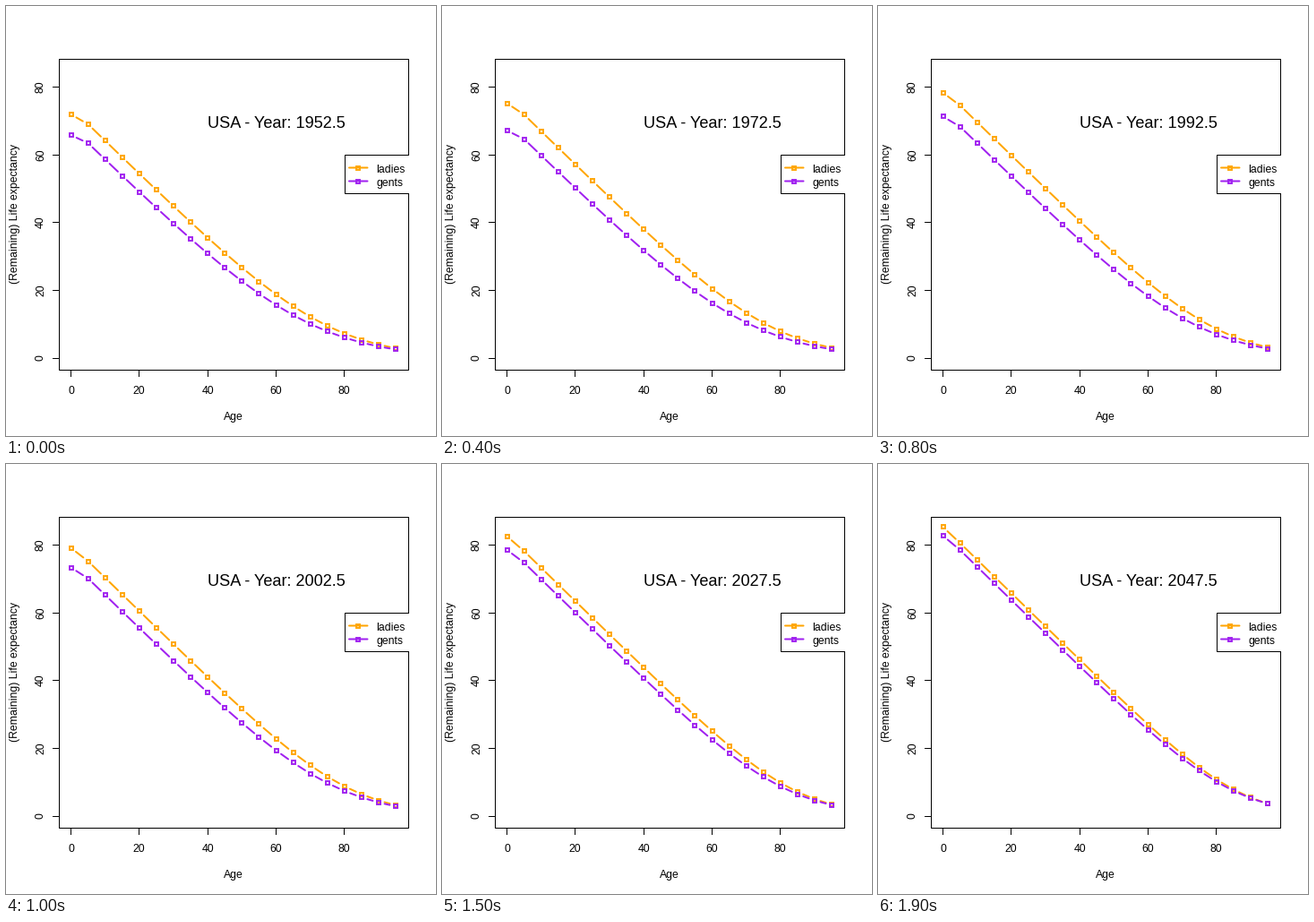
Write a matplotlib script that moves like this. It is 480 by 480 pixels and loops after 2000 ms.

```python
import numpy as np
import matplotlib.pyplot as plt
from matplotlib.animation import FuncAnimation
from matplotlib.collections import LineCollection

SIZE, DPI = 480, 80
PX = 72 / DPI          # points per pixel
FRAMES, STEP = 20, 100
GAP = 6.8              # clear space around each marker
AGES = np.arange(0, 100, 5)

plt.rcParams["font.family"] = "Liberation Sans"

# span: typical length of life, spread: softness of the bend,
# infant: years lost at birth; each goes from first to last value.
# pace: progress reached at a few steps.
GROUPS = [
    dict(name="ladies", color="#ffa500", span=(75, 86.8), spread=(14, 10.2),
         infant=(2.0, 0.2), pace=([0, 3, 6, 10, 19], [0, 0.16, 0.42, 0.54, 1])),
    dict(name="gents", color="#a020f0", span=(69.2, 84.7), spread=(15.4, 11.2),
         infant=(2.5, 0.7), pace=([0, 3, 19], [0, 0.02, 1])),
]


def to_x(age):
    return 72.6 + 3.815 * age


def to_y(years):
    return 393.3 - 3.785 * years


def curve(group, i):
    """Pixel points of one group's curve at step i."""
    p = np.interp(i, *group["pace"])
    span, spread, infant = (np.interp(p, [0, 1], group[key])
                            for key in ("span", "spread", "infant"))
    years = 0.985 * spread * np.log1p(np.exp((span - AGES) / spread))
    years -= infant * np.exp(-AGES)
    return np.column_stack([to_x(AGES), to_y(years)])


def dashes(pts):
    """Segments between neighbours, shortened at both ends."""
    a, b = pts[:-1], pts[1:]
    d = b - a
    cut = d * (GAP / np.hypot(d[:, 0], d[:, 1]))[:, None]
    return np.stack([a + cut, b - cut], axis=1)


fig = plt.figure(figsize=(SIZE / DPI, SIZE / DPI), dpi=DPI, facecolor="white")
ax = fig.add_axes([0, 0, 1, 1])
ax.set_xlim(0, SIZE)
ax.set_ylim(SIZE, 0)
ax.axis("off")


def line(xs, ys, color="black", width=1, cap="projecting", **kw):
    ax.plot(xs, ys, color=color, lw=width * PX, solid_capstyle=cap,
            solid_joinstyle="miter", snap=False, **kw)


def label(x, y, text, size=12.2, **kw):
    kw = {"ha": "center", "va": "baseline", "rotation_mode": "anchor", **kw}
    return ax.text(x, y, text, fontsize=size * PX, color="black", **kw)


def markers(xs, ys, color):
    return ax.plot(xs, ys, "s", ms=3.4 * PX, mfc="none", mec=color,
                   mew=1.9 * PX, snap=False, zorder=5)[0]


# Plot frame and axes
line([59.5, 449.5, 449.5, 59.5, 59.5], [59.5, 59.5, 406.5, 406.5, 59.5])
for v in range(0, 81, 20):
    x, y = int(to_x(v)) + 0.5, int(to_y(v)) + 0.5
    line([x, x], [406.5, 413.5])
    line([52.5, 59.5], [y, y])
    label(x, 433, str(v))
    label(42, y - 0.5, str(v), rotation=90)
label(253.5, 462, "Age")
label(13.5, 231.5, "(Remaining) Life expectancy", rotation=90)
title = label(301.5, 136, "", size=18.1)

# Legend, open on the right where the plot area ends
ax.fill([378.5, 450, 450, 378.5], [166.5, 166.5, 209.5, 209.5],
        color="white", lw=0, zorder=3)
line([449.5, 378.5, 378.5, 449.5], [166.5, 166.5, 209.5, 209.5], zorder=4)

series = []
for k, group in enumerate(GROUPS):
    color, y = group["color"], 180.5 + 15 * k
    line([383, 403.5], [y, y], color, 2, cap="round", zorder=4)
    markers([392.5], [y], color)
    label(413, y + 5.5, group["name"], ha="left", zorder=5)

    segs = LineCollection([], colors=color, linewidths=2 * PX,
                          capstyle="round", zorder=5)
    ax.add_collection(segs, autolim=False)
    series.append((group, segs, markers([], [], color)))


def update(i):
    title.set_text(f"USA - Year: {1952.5 + 5 * i:.1f}")
    for group, segs, dots in series:
        pts = curve(group, i)
        segs.set_segments(dashes(pts))
        dots.set_data(pts[:, 0], pts[:, 1])
    return [title]


anim = FuncAnimation(fig, update, frames=FRAMES, interval=STEP,
                     init_func=lambda: update(0), repeat=True, repeat_delay=0)
plt.show()
```
